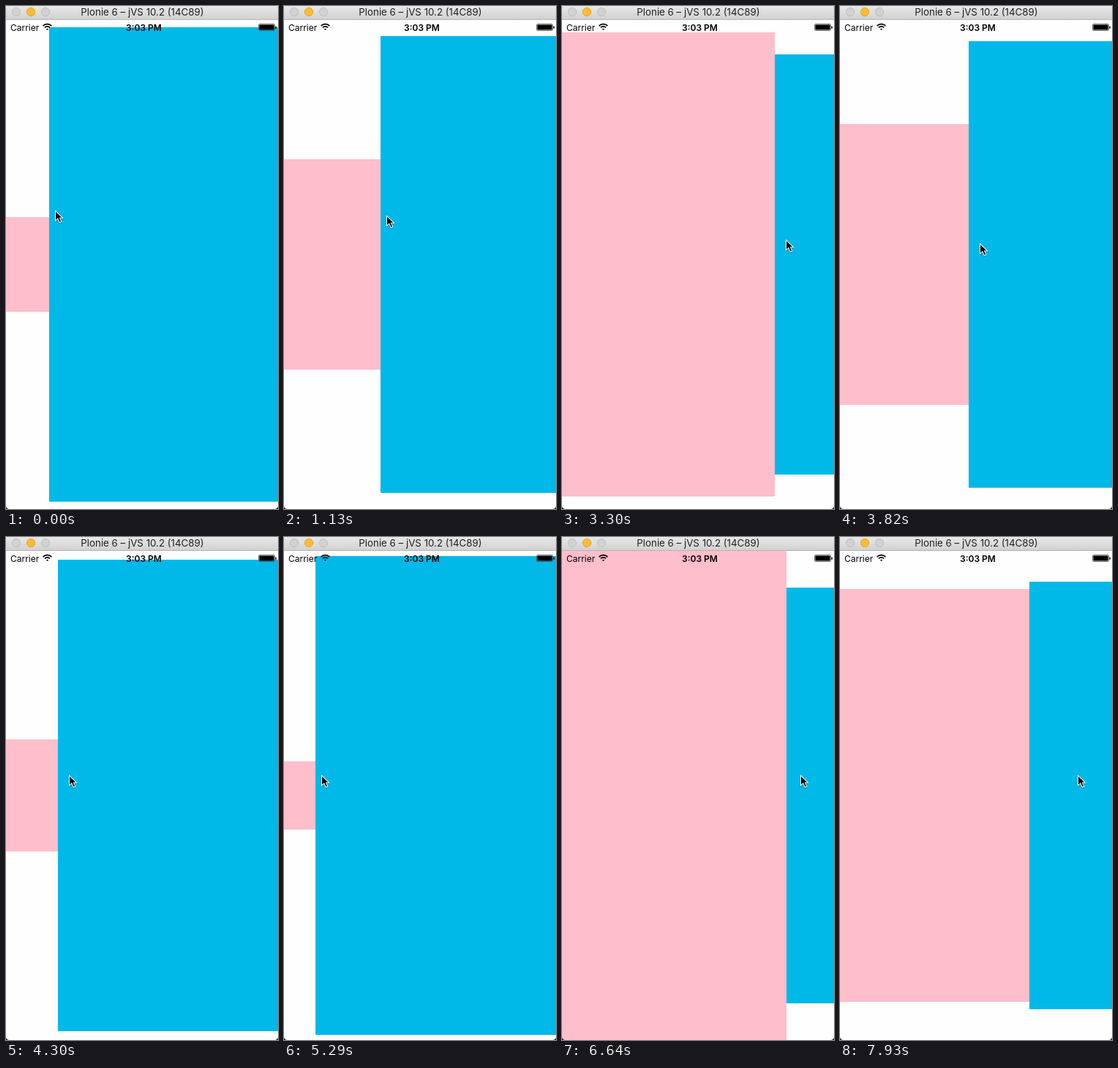
Recreate the animation shown at these times as an HTML page with a canvas. Size 372 px wide and 686 px high, loop 7990 ms.

```html
<!DOCTYPE html>
<html lang="en">
<head>
<meta charset="utf-8">
<title>Drawer</title>
<style>
  html, body { margin: 0; width: 100%; height: 100%; overflow: hidden; background: #fefefe; }
  canvas { display: block; }
</style>
</head>
<body>
<canvas id="stage" width="372" height="686"></canvas>
<script>
const ctx = document.getElementById('stage').getContext('2d');
const W = 372, H = 686, BAR = 19, LOOP = 7990;
const OPEN = 306.9, HALF = (H - BAR) / 2;
const TAP = 350, TAPS = [7050, 7885];

// Where the hand turns or changes pace: [time, x]
const strokes = [
  [0, 67], [810, 113], [870, 113], [1130, 140], [2000, 233], [2560, 322],
  [3150, 322], [3300, 306], [4680, 2], [5050, 2], [6663, 331], [6880, 325]
];

const clamp = (v, low, high) => Math.min(high, Math.max(low, v));
const ramp = (t, from, to) => clamp((t - from) / (to - from), 0, 1);
const smooth = u => u * u * (3 - 2 * u);

function handX(t) {
  let x = strokes[0][1];
  for (let i = 1; i < strokes.length; i++) {
    const [t0, x0] = strokes[i - 1], [t1, x1] = strokes[i];
    x += (x1 - x0) * ramp(t, t0, t1);
  }
  return x;
}

const handY = t => 278 + 46 * smooth(ramp(t, 100, 4200));

// The drawer follows the hand at a slowly changing distance; taps make it spring.
function drawerWidth(t) {
  const grip = 8 + 7 * (ramp(t, 1130, 2000) - ramp(t, 4700, 5000));
  const dragged = clamp(handX(t) - grip, 0, OPEN);
  const dip = TAPS.reduce((sum, tap) => sum + Math.sin(Math.PI * ramp(t, tap, tap + TAP)) ** 2, 0);
  return dragged * (1 - dip);
}

function panel(left, right, inset, color) {
  const gap = Math.round(inset);
  ctx.fillStyle = color;
  ctx.fillRect(left, BAR + gap, right - left, H - BAR - 2 * gap);
}

function drawPanels(t) {
  const width = drawerWidth(t), edge = Math.round(width);
  panel(edge, W, 0.35 + width * 0.1615, '#00b9e9');
  panel(0, edge, HALF * (1 - width / OPEN), '#ffbecb');
}

function label(text, x, font, align, y, color) {
  ctx.font = font + ' Inter, "Open Sans", sans-serif';
  ctx.textAlign = align;
  ctx.fillStyle = color;
  ctx.fillText(text, x, y);
}

function roundBox(x, y, w, h, r) {
  ctx.beginPath();
  ctx.roundRect(x, y, w, h, r);
}

function drawStatusBar() {
  label('Carrier', 6, '12px', 'left', 33.5, '#000');
  label('3:03 PM', 188.5, '600 12px', 'center', 33.5, '#000');

  ctx.strokeStyle = '#000';
  ctx.lineWidth = 1.8;
  for (const r of [1.4, 5, 8.3]) {
    ctx.beginPath();
    ctx.arc(56.5, 33, r, -Math.PI * 0.75, -Math.PI * 0.25);
    ctx.stroke();
  }

  ctx.strokeStyle = '#555';
  ctx.lineWidth = 0.8;
  roundBox(345.5, 24.5, 22, 9, 1.5);
  ctx.stroke();
  roundBox(346.4, 25.4, 20.2, 7.2, 0.8);
  ctx.fill();
  roundBox(368.4, 27.5, 1.4, 3.4, 0.7);
  ctx.fill();
}

function drawTitleBar() {
  const shade = ctx.createLinearGradient(0, 0, 0, 18);
  shade.addColorStop(0, '#e8e8e8');
  shade.addColorStop(1, '#d1d1d1');
  ctx.fillStyle = shade;
  ctx.fillRect(0, 0, W, 18);
  ctx.fillStyle = '#b4b4b4';
  ctx.fillRect(0, 18, W, 1);

  for (let i = 0; i < 3; i++) {
    ctx.beginPath();
    ctx.arc(14 + i * 20, 8, 5.6, 0, Math.PI * 2);
    ctx.fillStyle = i === 1 ? '#fdbd2f' : '#d2d2d2';
    ctx.strokeStyle = i === 1 ? '#dda02c' : '#bcbcbc';
    ctx.lineWidth = 0.9;
    ctx.fill();
    ctx.stroke();
  }
  label('Plonie 6 – jVS 10.2 (14C89)', 186.5, '13.3px', 'center', 13, '#222');
}

function drawCorners() {
  ctx.fillStyle = '#222';
  for (const [x, dir] of [[0, 1], [W, -1]]) {
    ctx.beginPath();
    ctx.moveTo(x, H - 4);
    ctx.quadraticCurveTo(x + dir * 0.5, H - 0.5, x + dir * 4, H);
    ctx.lineTo(x, H);
    ctx.fill();
  }
}

const arrow = new Path2D('M1 2.4V13.7L4 11.1L6.5 16.6L8.1 15.9L5.7 10.6H9.3Z');

function drawCursor(t) {
  ctx.save();
  ctx.translate(Math.round(handX(t)), Math.round(handY(t)));
  ctx.shadowColor = 'rgba(0,0,0,0.35)';
  ctx.shadowBlur = 2;
  ctx.shadowOffsetY = 1;
  ctx.strokeStyle = '#fff';
  ctx.lineWidth = 2;
  ctx.stroke(arrow);
  ctx.shadowColor = 'transparent';
  ctx.fillStyle = '#000';
  ctx.fill(arrow);
  ctx.restore();
}

function render(t) {
  ctx.fillStyle = '#fefefe';
  ctx.fillRect(0, 0, W, H);
  drawPanels(t);
  drawStatusBar();
  drawTitleBar();
  drawCorners();
  drawCursor(t);
}

let start = null;
function tick(now) {
  if (start === null) start = now;
  render((now - start) % LOOP);
  requestAnimationFrame(tick);
}
render(0);
requestAnimationFrame(tick);
</script>
</body>
</html>
```
